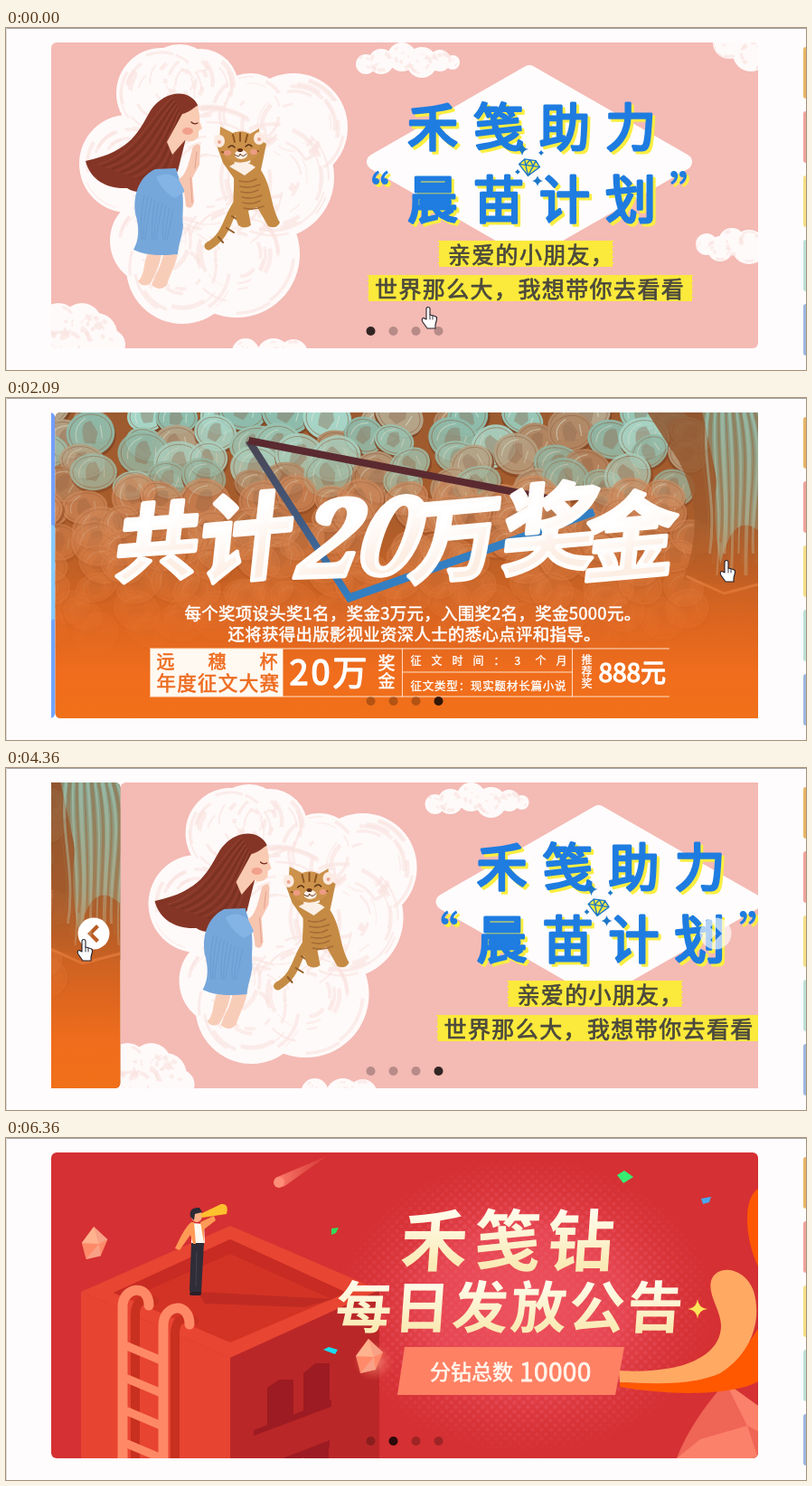
Write an HTML page that moves like this. It is 885x378 px and loops after 7.48 s.

```html
<!DOCTYPE html>
<html lang="zh-CN">
<head>
<meta charset="utf-8">
<title>Carousel</title>
<style>
html, body { margin: 0; width: 100%; height: 100%; overflow: hidden; background: #fefcfd; }
svg { display: block; width: 100vw; height: 100vh; }
text { font-family: "Noto Sans CJK SC", "Noto Sans CJK", "Noto Sans", sans-serif; white-space: pre; }
</style>
</head>
<body>
<script>
const LOOP = 7480, WIDTH = 782;

// ---------- drawing helpers ----------
let seed = 7;
const rand = (a = 0, b = 1) => {
  seed = (seed * 16807) % 2147483647;
  return a + (b - a) * seed / 2147483647;
};
const repeat = (n, fn) => Array.from({ length: n }, (_, i) => fn(i)).join('');
const path = (d, fill, more = '') => `<path d="${d}" fill="${fill}" ${more}/>`;
const line = (d, stroke, width, more = 'stroke-linecap="round"') =>
  path(d, 'none', `stroke="${stroke}" stroke-width="${width}" stroke-linejoin="round" ${more}`);
const rect = (x, y, w, h, fill, more = '') =>
  `<rect x="${x}" y="${y}" width="${w}" height="${h}" fill="${fill}" ${more}/>`;
const oval = (x, y, rx, ry, fill, more = '') =>
  `<ellipse cx="${x}" cy="${y}" rx="${rx}" ry="${ry}" fill="${fill}" ${more}/>`;
const group = (content, more) => `<g ${more}>${content}</g>`;
const shift = (content, x, y) => group(content, `transform="translate(${x} ${y})"`);
// x is the left edge, cy the middle of the glyph box, step the advance of one ideograph
const text = (s, x, cy, size, step, fill, more = '') =>
  `<text x="${x}" y="${cy + size * .38}" font-size="${size}" letter-spacing="${step - size}" fill="${fill}" ${more}>${s}</text>`;
const outlined = (color, width) => `stroke="${color}" stroke-width="${width}" stroke-linejoin="round"`;
const medium = (s, x, cy, size, step, fill) => text(s, x, cy, size, step, fill, outlined(fill, size * .03));
const stops = list => list.map(([at, color, alpha = 1]) =>
  `<stop offset="${at}" stop-color="${color}" stop-opacity="${alpha}"/>`).join('');
const linear = (id, x2, y2, ...list) =>
  `<linearGradient id="${id}" x2="${x2}" y2="${y2}">${stops(list)}</linearGradient>`;

const cloud = lobes =>
  lobes.map(([x, y, r]) => oval(x, y, r, r, '#fefaf9')).join('') +
  lobes.map(([x, y, r]) => repeat(Math.round(r / 2.6), () => {
    const q = r * rand(.3, .95), a = rand(0, 6.28), b = a + rand(.3, .9);
    const at = v => `${(x + q * Math.cos(v)).toFixed(1)} ${(y + q * Math.sin(v)).toFixed(1)}`;
    return line(`M${at(a)}A${q} ${q} 0 0 1 ${at(b)}`, '#fae3df', rand(1, 5), 'opacity=".6"');
  })).join('');

const gem = (x, y, s, fill, stroke) => group(
  path('M-6-6H6L11 0 0 11-11 0Z', fill) + line('M-6-6H6L11 0 0 11-11 0ZM-11 0H11M-6-6L-4 0 0 11 4 0 6-6M-4 0L0-6 4 0', stroke, 1.3),
  `transform="translate(${x} ${y}) scale(${s}) rotate(8)"`);
const sparkle = (x, y, r, fill) => path(
  `M${x} ${y - r}Q${x + 1} ${y - 1} ${x + r} ${y}Q${x + 1} ${y + 1} ${x} ${y + r}Q${x - 1} ${y + 1} ${x - r} ${y}Q${x - 1} ${y - 1} ${x} ${y - r}`, fill);
const cube = (x, y, w, h, top, left, right) =>
  path(`M${x} ${y - h}l${w} ${h / 2}-${w} ${h / 2}-${w}-${h / 2}Z`, top) +
  path(`M${x - w} ${y - h / 2}l${w} ${h / 2}v${h}l-${w}-${h / 2}Z`, left) +
  path(`M${x + w} ${y - h / 2}l-${w} ${h / 2}v${h}l${w}-${h / 2}Z`, right);

// ---------- slides, in stage coordinates ----------
function dreamSlide() {
  const clouds = [
    [[172, 72, 50], [192, 60, 42], [215, 65, 42], [318, 110, 60], [270, 95, 45], [295, 165, 68], [135, 150, 54],
      [165, 235, 50], [195, 265, 62], [255, 250, 70], [225, 170, 90]],
    [[398, 40, 11], [415, 37, 14], [438, 32, 16], [460, 38, 17], [480, 36, 12], [494, 38, 8]],
    [[800, 16, 18], [824, 28, 20]],
    [[775, 239, 12], [803, 236, 15], [822, 242, 19], [790, 244, 14]],
    [[58, 325, 21], [84, 326, 22], [100, 338, 23], [115, 350, 17], [70, 350, 25]],
    [[265, 358, 15], [296, 362, 19], [318, 360, 16]]
  ].map(cloud).join('');

  const girl =
    path('M158 248C150 262 155 272 146 280Q152 288 160 282C166 270 170 262 172 250ZM174 249C172 264 165 272 161 284Q170 292 178 284C182 270 189 260 190 248Z', '#f8cdb8') +
    path('M212 85C203 67 176 68 160 91C147 113 140 136 88 147C92 164 107 178 134 177C150 188 177 177 190 158L199 122Z', '#853526') +
    repeat(13, i => line(`M${184 + i} ${77 + i * 2}C${160 + i * 2} ${96 + i * 4} ${148 + i * 3} ${137 + i * 2} ${102 + i * 5} ${151 + i * 1.7}`, i % 2 ? '#74301f' : '#91402f', 1.3)) +
    path('M195 95C201 94 207 89 211 86Q215 94 214 103L217 111 213 114 213 120Q207 128 198 124L184 140 178 126Z', '#f9cbb2') +
    oval(201, 114, 6, 4, '#ef9684', 'opacity=".8"') + line('M205 104q3 3 7 1', '#6d281d', 1.3) +
    path('M165 156C149 163 140 182 143 205C148 221 147 235 141 245C157 253 178 251 190 250C191 238 195 231 196 218C194 205 199 190 192 168L188 155Z', '#76a7db') +
    path('M166 165C179 157 192 163 199 180L187 188Q176 184 166 165Z', '#84b4e5') +
    repeat(9, i => line(`M${153 + i * 4} ${184 + i * 2}q-5 26-${3 + i % 3 * 2} ${50 - i * 2}`, '#6797cd', 1.2, 'opacity=".6"')) +
    path('M191 167C201 162 203 144 207 131Q214 125 215 132L214 151 206 166 208 192Q206 202 199 197L197 179Z', '#f7c6b1') +
    line('M211 137L209 155M204 165l2 28', '#e3a18d', 1);

  const cat =
    line('M259 190C244 206 247 228 224 241', '#c58b44', 9) +
    line('M250 208l8 5M244 221l8 5M235 231l5 6', '#925d2a', 2) +
    path('M240 149L252 166C253 183 248 197 257 218Q264 223 271 218L268 202 278 198 290 219Q299 223 303 215C292 196 295 177 282 157L288 128 275 120 270 149 253 150 245 122 232 127Z', '#c58b44') +
    path('M247 153Q263 143 276 154L264 163Z', '#fcf0e6') +
    path('M236 127L237 109 251 116Q261 112 270 117L280 111 281 129C283 154 236 157 236 127Z', '#cd924b') +
    line('M251 118l2 8M259 116v9M267 118l-2 8M239 137l7 2M279 136l-7 2', '#8d5521', 2) +
    repeat(6, i => line(`M${258 + i} ${169 + i * 6}q10 3 ${19 + i % 2 * 3}-2`, '#a56c36', 1.6)) +
    line('M246 132q4-4 7 0M265 131q4-4 7 0', '#5b3319', 1.4) +
    oval(245, 138, 4, 3, '#ed9c84') + oval(274, 137, 4, 3, '#ed9c84') +
    oval(260, 140, 7, 5, '#fcf0e6') + oval(259, 135, 3, 2, '#603018') + line('M253 140q6 4 6-1q3 5 7 0', '#603018', 1) +
    [[236, 125], [280, 122]].map(([x, y]) => oval(x, y, 6, 7, '#fcebe1') + oval(x, y + 1, 2, 2, '#eda594')).join('');

  const title = color =>
    ['禾笺助力', '晨苗计划'].map((s, row) => [...s].map((c, i) =>
      text(c, 444 + i * 73, 109 + row * 80, 56, 56, color, outlined(color, 3))).join('')).join('') +
    text('“', 376, 181, 48, 48, color, 'font-weight="700"') + text('”', 734, 181, 48, 48, color, 'font-weight="700"');
  const banner = (x, y, w) => rect(x, y, w, 29, '#fbe93b') +
    line(`M${x} ${y}v29M${x + w} ${y}v29`, '#fbe93b', 3, 'stroke-dasharray="1 5"');

  return rect(50, 16, WIDTH, 338, '#f4bab4') + clouds + girl + cat +
    path('M579 50L750 148 579 246 408 148Z', '#fefcfc', outlined('#fefcfc', 18)) +
    shift(title('#fbee42'), 3, 3) + title('#1f7ce0') +
    gem(579, 152, 1.05, '#f8ea3d', '#1d77c8') +
    [[571, 134, 7], [588, 169, 6], [592, 138, 3], [566, 159, 3]].map(s => sparkle(...s, '#1d77c8')).join('') +
    banner(479, 235, 192) + banner(401, 273, 358) +
    medium('亲爱的小朋友，', 489, 250, 25, 26.3, '#4b493d') +
    medium('世界那么大，我想带你去看看', 408, 288, 25, 26.4, '#4b493d');
}

function noticeSlide() {
  const building =
    path('M248 97L413 168 248 243 83 170Z', '#e84532') + path('M248 112L377 171 248 226 119 171Z', '#d33325') +
    path('M248 112L377 171 360 178 248 128 135 178 119 171Z', '#c72b23') +
    path('M83 170L248 243V354H83Z', '#e74431') + path('M413 168L248 243V354H413Z', '#ba2728') +
    path('M212 170L362 178 330 187 220 183Z', '#b92822', 'opacity=".75"') +
    path('M274 323L360 289V297L274 329ZM289 276L302 267H318V306L289 317ZM329 260L342 249H358V290L329 302ZM306 354L358 334V342L326 354ZM330 354V346L342 341H357V354Z', '#9d1b22');
  const ladder =
    line('M143 354V196Q143 174 164 180M187 354V217Q187 194 208 202', '#c8301f', 10) +
    repeat(5, i => line(`M134 ${230 + i * 36}L172 ${246 + i * 36}`, '#ff8966', 9)) +
    line('M129 354V186C129 165 158 160 158 185M174 354V207C174 184 203 180 203 206', '#ff8966', 11);
  const man =
    path('M205 116H219L216 171 208 173 203 169Z', '#2f2d38') + line('M211 126L210 164', '#47424d', 1) +
    line('M205 172h9', '#291f29', 4) + path('M205 94L219 95 220 116H205Z', '#fff8ee') +
    path('M205 93Q198 98 187 122L192 124 204 107 207 117H210L208 93ZM215 93L230 86 232 91 219 101 219 116Z', '#ff9a56') +
    oval(211, 86, 6, 7, '#ffb184') + path('M204 87Q202 76 214 77L217 82 209 84 208 91Z', '#2c2a34') +
    path('M215 84L238 73Q247 72 244 84L217 88Z', '#ffc02e');
  const rock = (x, y, s) => group(
    path('M-3-20L13-5 5 14-12 18-17-1Z', '#ff8a69') + path('M-3-20L3 0 13-5ZM3 0L5 14-12 18Z', '#f8a186') + path('M-3-20L-17-1 3 0Z', '#ffb28e'),
    `transform="translate(${x} ${y}) scale(${s})"`);
  const swirl =
    path('M832 56C815 67 817 110 832 142ZM679 270C745 273 790 263 817 233L832 211V269C804 285 734 285 679 275Z', '#ff5800') +
    path('M678 257C735 261 789 247 791 209C792 192 776 174 780 158C786 139 817 142 827 169C837 202 824 239 790 260C756 275 710 271 679 270Z', '#ffa963');
  const confetti =
    path('M676 41L684 36 694 43 683 50Z', '#37ed72') + path('M769 67L780 65 778 71 771 73Z', '#4aa7ef') +
    path('M360 100L368 99 365 105 360 107Z', '#35da59') + path('M351 234L357 231 367 234 364 239Z', '#19dcf0');
  const title = (s, x, cy, size, step) => group(text(s, 0, 0, size, step, 'url(#cream)', 'font-weight="900"'),
    `transform="translate(${x} ${cy}) skewX(-4)"`);

  return rect(50, 16, WIDTH, 338, '#d53033') + rect(360, 16, 430, 338, 'url(#glow)') +
    rect(360, 16, 430, 338, 'url(#halftone)', 'mask="url(#fade)"') +
    building + ladder + man + path('M298 44L355 20 307 54Z', 'url(#comet)') + oval(302, 49, 6, 6, '#ff8d78') +
    rock(100, 117, .95) + oval(407, 247, 23, 22, 'url(#rockGlow)') + rock(404, 242, 1) +
    path('M796 270L832 296V354H742Q757 314 796 270Z', '#ef6556') + path('M796 270L820 318 832 324V296ZM742 354L768 333 820 318 832 354Z', '#ff8b70', 'opacity=".75"') +
    swirl + confetti + title('禾笺钻', 437, 113, 74, 81) + title('每日发放公告', 365, 186, 62, 64.5) +
    sparkle(765, 189, 11, '#ffe458') + path('M441 231H684L674 284H433Z', '#ff8164') +
    medium('分钻总数', 469, 258, 23, 23, '#fff5eb') + medium('10000', 568, 258, 28, 28.4, '#fff5eb');
}

function rankingSlide() {
  const card = (y, count) =>
    path(`M551 ${y + 5}L659 ${y + 49}Q666 ${y + 52} 666 ${y + 59}V${y + 89}Q666 ${y + 99} 657 ${y + 95}L549 ${y + 49}Q544 ${y + 46} 544 ${y + 40}V${y + 8}Q544 ${y + 2} 551 ${y + 5}Z`, 'url(#card)', 'stroke="#f1fbff" stroke-width="1"') +
    oval(561, y + 32, 13, 15, '#2cafe6') + oval(561, y + 27, 4, 5, '#e9fbff') + path(`M552 ${y + 37}q9-10 18 4l-2 3q-9 0-16-7Z`, '#e9fbff') +
    repeat(count, i => gem(587 + i * 15.6, y + 43 + i * 7.3, .58, '#30c8d4', '#168fa9'));
  const phone =
    path('M570 39Q571 28 583 32L679 68Q688 72 688 83V312Q687 323 677 319L582 280Q570 275 570 264Z', '#6af1fb') +
    path('M576 49Q577 40 586 43L676 78Q680 80 680 87V304Q680 311 674 308L583 270Q576 267 576 260Z', 'url(#screen)') +
    line('M617 59L633 65', '#22bfd8', 3) +
    [55, 115, 173].map(y => path(`M576 ${y + 64}L680 ${y + 106}V${y + 120}L576 ${y + 78}Z`, '#2390ee', 'opacity=".6"')).join('');
  const woman =
    path('M611 261L625 262 624 318 611 319 609 298Z', '#241e2d') + line('M606 321h9M618 320h8', '#221d29', 3) +
    path('M612 239Q621 234 629 243L628 265 610 264 608 253 598 237 601 235Z', '#ee5870') +
    path('M613 226Q623 220 627 233Q631 249 626 256L618 251Z', '#6b273c') + oval(615, 231, 4, 6, '#f2a5a3');
  const title = (dx, fill) => group(
    text('今日份', 138, 79, 44, 44, fill, 'font-weight="700"') + text('搓搓手', 304, 79, 44, 44, fill, 'font-weight="700"') +
    text('看排行', 135, 163, 99, 103, fill, 'font-weight="900"'), `transform="translate(${dx} ${dx})"`);

  return rect(50, 16, WIDTH, 338, 'url(#blue)') +
    path('M50 16H306L214 48 150 22 50 64Z', '#7662ef', 'opacity=".3"') + path('M306 16H630L428 58Z', '#8d8dfc', 'opacity=".4"') +
    cube(82, 211, 39, 41, '#a8cbff', '#82b5ff', '#73a6fb') + cube(478, 162, 19, 23, '#b8caff', '#9eb6ff', '#8ca9fb') +
    path('M709 148L772 114 832 142V244L768 267 709 237Z', '#86caff') +
    path('M466 280L607 212 787 282V354H466Z', 'url(#floor)') + path('M623 354L787 282V354Z', '#77bffe') +
    path('M762 99L789 115Q794 118 794 124V158L763 144Q757 140 757 134V103Q756 97 762 99Z', '#b4deff') + gem(775, 129, 1.15, '#35c0d0', '#8be0ee') +
    phone + card(55, 3) + card(115, 5) + card(173, 2) + woman +
    title(3, '#656bdc') + title(0, 'url(#ice)') +
    path('M146 223H427Q435 223 435 231V257L444 264 435 270V302Q435 310 427 310H146Q138 310 138 302V231Q138 223 146 223Z', '#bdd0ff', 'opacity=".75"') +
    medium('小帮手带你直击现场', 149, 249, 28, 31.2, '#29146c') +
    medium('分析禾笺钻此刻局势', 149, 284, 28, 31.2, '#29146c');
}

function prizeSlide() {
  const tones = ['#a5d6c9', '#8cbdae', '#97c6b6', '#b3a58a', '#b08a68'];
  const coins = repeat(11, row => repeat(17, col => {
    const x = 50 + col * 43 + rand(-17, 17), y = 22 + row * 23 + rand(-10, 10);
    const r = rand(22, 29), flat = r * rand(.68, .92);
    const face = row < 4 ? tones[Math.floor(rand(0, 5))] : '#cc9067';
    return group(
      oval(1, 3, r, flat, '#7d4526') + oval(0, 0, r, flat, face) +
      oval(0, 0, r * .87, flat * .85, 'none', 'stroke="#8a5f45" stroke-width=".8" opacity=".7"') +
      path(`M-${r * .3} ${flat * .4}Q-${r * .45}-${flat * .6} ${r * .1}-${flat * .55}L${r * .3} 0 ${r * .12} ${flat * .5}Z`, '#8a6a54', 'opacity=".4"') +
      line(`M-${r * .6} ${flat * .3}Q-${r * .7}-${flat * .4}-${r * .1}-${flat * .7}M${r * .45}-${flat * .3}v${flat * .6}`, '#dbe6d6', 1.2, 'opacity=".6"'),
      `transform="translate(${x.toFixed(1)} ${y.toFixed(1)}) rotate(${rand(-35, 35).toFixed(0)})" opacity="${(1 - row * .075).toFixed(2)}"`);
  }));
  const jar = path('M705 16H832V212L745 200Q772 130 740 70Z', '#8f5630', 'opacity=".85"') +
    path('M766 16H832V150Q800 120 786 184Q776 130 782 90Z', '#86b7a6', 'opacity=".75"') +
    repeat(16, i => line(`M${768 + i * 4} 16C${758 + i * 6} 72 ${780 + i * 3} 111 ${770 + i * 4} ${160 + i % 4 * 12}`, i % 2 ? '#a5cfbf' : '#96663f', 2 + i % 3, 'opacity=".5"')) +
    line('M748 197L790 216 832 205', '#dd9c6c', 3, 'opacity=".7"');
  const brush = (s, x, cy, size, turn, more = '') => group(
    text(s, -size / 2, 0, size, size, 'url(#paint)', `font-weight="900" ${outlined('#fffdfb', 5)} ${more}`),
    `transform="translate(${x} ${cy}) rotate(${turn}) skewX(-11)"`);
  const spaced = (s, x, cy, size, step, fill) => [...s].map((c, i) => medium(c, x + i * step, cy, size, size, fill)).join('');
  const column = (s, x, y, size, step) => [...s].map((c, i) => medium(c, x, y + i * step, size, size, '#fff')).join('');

  return rect(50, 16, WIDTH, 338, '#9b5a2f') + coins + jar + rect(50, 16, WIDTH, 338, 'url(#warm)') +
    line('M264 47L376 222', 'url(#slate)', 8, '') + line('M264 47L600 112', '#5a2a30', 8, '') + line('M372 222L646 126', '#337fc2', 9, '') +
    brush('共', 164, 158, 92, -4) + brush('计', 262, 153, 103, -5) +
    brush('20', 389, 151, 118, -2, 'style="font-family:Noto Serif,serif;font-style:italic" text-anchor="middle" dx="59"') +
    brush('万', 493, 155, 100, -5) + brush('奖', 598, 143, 105, -5) + brush('金', 687, 152, 102, -5) +
    medium('每个奖项设头奖1名，奖金3万元，入围奖2名，奖金5000元。', 193, 238, 18.4, 18.75, '#fff') +
    medium('还将获得出版影视业资深人士的悉心点评和指导。', 241, 261, 18.4, 18.75, '#fff') +
    rect(155, 277, 147, 53, '#fff9f1') + line('M155 277H729M155 330H729M434 277V330M622 277V330M434 303H622', '#ffe1c9', 1) +
    spaced('远穗杯', 162, 291, 20, 57, '#ed6c20') + medium('年度征文大赛', 162, 315, 21.5, 22.8, '#ed6c20') +
    text('20万', 309, 303, 38, 41, '#fff', outlined('#fff', 1.5)) + column('奖金', 407, 293, 19, 20) +
    spaced('征文时间：3个月', 443, 290, 12, 23, '#fff') + medium('征文类型：现实题材长篇小说', 443, 318, 12.5, 13.3, '#fff') +
    column('推荐奖', 632, 289, 12, 13) + text('888元', 651, 303, 28, 28, '#fff', outlined('#fff', 1.3));
}

// ---------- stage ----------
const defs = `<defs>
  <clipPath id="view">${rect(50, 16, WIDTH, 338, '#000')}</clipPath>
  <clipPath id="rounded">${rect(50, 16, WIDTH, 338, '#000', 'rx="6"')}</clipPath>
  <pattern id="halftone" width="10" height="10" patternUnits="userSpaceOnUse">${oval(2.5, 2.5, 2.3, 2.3, '#e95360') + oval(7.5, 7.5, 2.3, 2.3, '#e95360')}</pattern>
  <radialGradient id="glow">${stops([[0, '#ef5360'], [.5, '#e94a57', .85], [1, '#d53033', 0]])}</radialGradient>
  <radialGradient id="fadeFill">${stops([[0, '#fff'], [.55, '#aaa'], [1, '#000']])}</radialGradient>
  <radialGradient id="rockGlow">${stops([[0, '#ffa18b', .8], [1, '#e95b4c', 0]])}</radialGradient>
  <mask id="fade">${rect(360, 16, 430, 338, 'url(#fadeFill)')}</mask>
  ${linear('cream', 0, 1, [.2, '#fffdf0'], [.8, '#faeab5'])}
  ${linear('comet', 1, 0, [0, '#ff816f'], [1, '#e3574b', .3])}
  ${linear('blue', 1, .5, [0, '#817afa'], [.4, '#738dff'], [1, '#73a5ff'])}
  ${linear('card', 1, 1, [0, '#effdff'], [1, '#b9f1fb'])}
  ${linear('screen', 0, 1, [0, '#4cc4f8'], [.6, '#35b0f5'], [1, '#1f8cec'])}
  ${linear('floor', 1, 0, [0, '#6eeafe'], [.45, '#74e2ff'], [1, '#7cc4ff'])}
  ${linear('slate', 0, 1, [0, '#4a4450'], [.5, '#425a80'], [1, '#337fc2'])}
  ${linear('ice', 0, 1, [.35, '#ffffff'], [.85, '#c6d1ff'])}
  ${linear('warm', 0, 1, [0, '#e9671b', 0], [.35, '#e9671b', .2], [.66, '#ed681b', .75], [.85, '#f06d1d'], [1, '#f17019'])}
  ${linear('paint', .3, 1, [.5, '#ffffff'], [.83, '#fdeee4'])}
</defs>`;
const slideArt = [dreamSlide(), noticeSlide(), rankingSlide(), prizeSlide()];
const arrow = (x, dir) => path(
  `M${x - 17.5} 183a17.5 17.5 0 1 0 35 0a17.5 17.5 0 1 0-35 0Z` +
  `M${x - 3 * dir} 173L${x + 7 * dir} 183 ${x - 3 * dir} 193 ${x - 6 * dir} 190 ${x + dir} 183 ${x - 6 * dir} 176Z`,
  '#fff', 'fill-rule="evenodd" class="arrow"');
const edgeCards = ['#e9b564', '#f1a39d', '#f4df86', '#bce0d8', '#9db7de'];

document.body.innerHTML = `<svg viewBox="0 0 885 378" preserveAspectRatio="none">${defs}
  ${rect(0, 0, 885, 378, '#fefcfd')}${rect(0, 0, 885, 1, '#a5a3a4')}${rect(0, 0, 1, 378, '#dcdadb')}
  ${edgeCards.map((color, i) => rect(882, 21 + i * 71, 8, 57, color, 'rx="3"')).join('')}
  <g clip-path="url(#view)">${slideArt.map(art => group(group(art, 'clip-path="url(#rounded)"'), 'class="slide"')).join('')}</g>
  ${repeat(4, i => oval(403.5 + i * 25, 335, 5, 5, '#000', 'class="dot"'))}
  ${arrow(97, -1)}${arrow(785, 1)}
  <g id="cursor">${path('M6 14V2.5a2 2 0 0 1 4 0V9l5.5 1.5Q18 11 17.5 14L16 20V24H7L2 17Q0 13 3 12.5Z', '#fff', outlined('#25212a', 1.1))}${line('M10 9v5M13 10v4', '#25212a', .9)}</g>
</svg>`;

const all = name => [...document.querySelectorAll(name)];
const slides = all('.slide'), dots = all('.dot'), arrows = all('.arrow'), cursor = document.getElementById('cursor');

// ---------- motion ----------
// the picture is refreshed at these moments only
const TICKS = [0, 120, 270, 390, 510, 630, 1000, 1150, 1270, 1420, 1670, 1820, 1970, 2090, 2240, 2360, 2920, 3040,
  3190, 3310, 3430, 3580, 3700, 3820, 3940, 4090, 4240, 4360, 4510, 4630, 4780, 4910, 5190, 5340, 5460, 5580, 5700,
  5850, 5970, 6090, 6210, 6360];
const MOVES = [[130, 1], [887, 1], [1640, 1], [3182, 1], [4309, -1], [5107, -1], [5830, -1]];
const POINTER = [[1000, 791, 174], [1670, 791, 174], [1820, 789, 179], [2360, 789, 179], [2920, 780, 183], [3040, 760, 183],
  [3580, 596, 208], [3940, 76, 196], [4090, 80, 192], [4360, 78, 189], [5190, 92, 188], [5970, 92, 188]];

// cubic-bezier(.25, .1, .25, 1)
function ease(x) {
  if (x <= 0 || x >= 1) return x <= 0 ? 0 : 1;
  let lo = 0, hi = 1;
  for (let i = 0; i < 24; i++) {
    const s = (lo + hi) / 2;
    if (.75 * s * (1 - s) + s ** 3 < x) lo = s; else hi = s;
  }
  return .3 * lo * (1 - lo) ** 2 + 3 * lo * lo * (1 - lo) + lo ** 3;
}

function pointerAt(t) {
  if (t < 120) return [459, 308];
  const i = POINTER.findIndex(([time]) => time > t);
  if (i < 1) return null;
  const [a, ax, ay] = POINTER[i - 1], [b, bx, by] = POINTER[i], k = (t - a) / (b - a);
  return [Math.round(ax + (bx - ax) * k), Math.round(ay + (by - ay) * k)];
}

function arrowAlpha(t) {
  if (t >= 1000 && t < 1670) return .85;
  return t >= 2920 && t < 5970 ? Math.min(.65, (t - 2800) / 370) : 0;
}

function render(t) {
  const position = MOVES.reduce((sum, [start, dir]) => sum + dir * ease((t - start) / 500), 0);
  const active = MOVES.reduce((sum, [start, dir]) => sum + (t >= start ? dir : 0), 0) % 4;
  slides.forEach((slide, i) => {
    const x = ((i - position + 6) % 4 - 2) * WIDTH;
    slide.setAttribute('transform', `translate(${x.toFixed(2)} 0)`);
    slide.style.display = Math.abs(x) < WIDTH ? '' : 'none';
  });
  dots.forEach((dot, i) => dot.setAttribute('opacity', i === active ? .8 : .25));

  const pointer = pointerAt(t), alpha = arrowAlpha(t);
  cursor.style.display = pointer ? '' : 'none';
  if (pointer) cursor.setAttribute('transform', `translate(${pointer})`);
  arrows.forEach((el, i) => {
    const hovered = pointer && Math.hypot(pointer[0] + 8 - [97, 785][i], pointer[1] - 183) < 24;
    el.setAttribute('opacity', alpha && hovered ? 1 : alpha);
  });
}

const begin = performance.now();
let shown = -1;
function frame() {
  const now = (performance.now() - begin) % LOOP;
  const tick = TICKS.findLast(time => time <= now);
  if (tick !== shown) render(shown = tick);
  requestAnimationFrame(frame);
}
frame();
</script>
</body>
</html>
```
